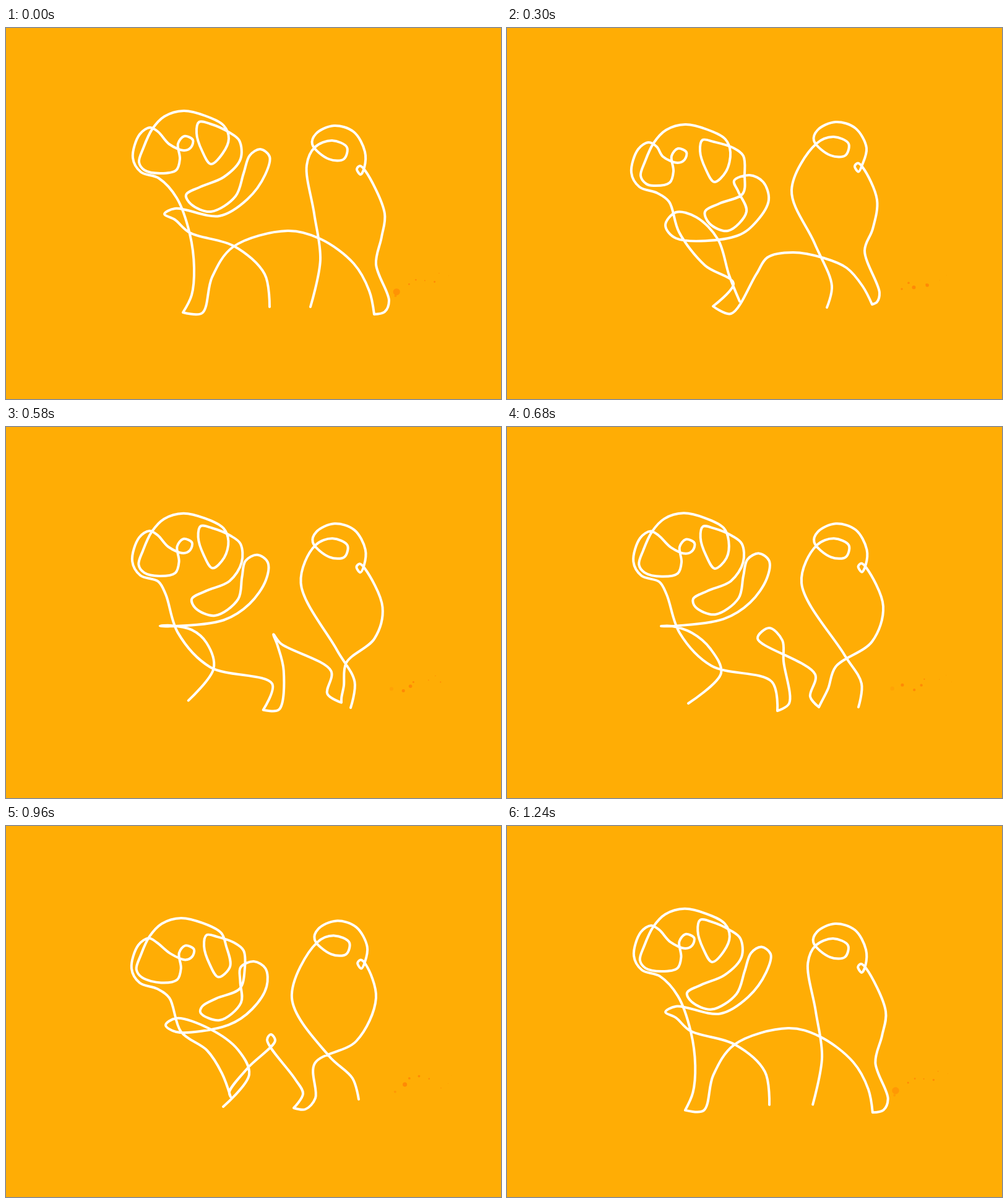
An HTML page with a canvas for the animation above (1.26 s loop, 800 px wide and 600 px high).

```html
<!DOCTYPE html>
<html lang="en">
<head>
<meta charset="utf-8">
<title>Walking line dog</title>
<style>
  html, body { margin: 0; width: 100%; height: 100%; overflow: hidden; background: #ffad05; }
  canvas { display: block; }
</style>
</head>
<body>
<canvas width="800" height="600"></canvas>
<script>
const LOOP = 1260;
const TIMES = [0, 180, 300, 480, 680, 960];

const numbers = text => text.trim().split(/[\s,]+/).map(Number);
const keys = text => text.trim().split('\n').map(numbers);
const pairs = flat => Array.from({ length: flat.length / 2 }, (_, i) => flat.slice(2 * i, 2 * i + 2));
const shape = text => pairs(numbers(text));

// Head motion at each key time: nod, flap of the bib, turn
const HEAD = keys(`
  0 0 0
  .53 .53 0
  1 1 0
  .39 .42 0
  .28 .2 .4
  .77 .55 1`);

// Tip of the collar and how far its loop opens
const COLLAR = keys(`
  256 301 18
  256 314 -10
  256 319 -42
  250 321 -9
  249 322 0
  258 322 -22`);

// Legs and belly: a few joints per key time
const FAR_FORELEG = keys(`
  426,451 418,398 369,353 297,331
  421,455 427,413 397,357 330,325
  376,442 359,400 341,342 306,306
  310,439 333,385 325,340 304,321
  293,447 346,398 329,359 299,333
  351,454 393,402 375,362 329,328`);
const NEAR_FORELEG = keys(`
  276,275 297,333 304,388 300,432 286,460
  266,275 289,338 312,386 317,425 293,453
  262,281 278,330 320,384 366,413 333,450
  259,272 277,332 328,388 419,417 383,454
  258,271 279,333 330,386 428,412 437,459
  264,278 283,333 325,363 349,400 363,438`);
const BELLY = keys(`
  317,461 333,403 367,354 455,328 508,341 562,381 587,425 595,463
  323,459 357,396 395,357 455,349 516,358 552,384 579,415 592,454
  362,462 403,398 421,371 462,363 512,372 549,388 575,418 590,447
  413,465 441,408 431,363 443,348 486,360 549,390 550,426 577,440
  456,447 447,379 445,345 424,325 405,342 498,400 490,436 504,453
  361,430 391,391 435,347 428,337 422,346 467,409 480,433 465,456`);
const NEAR_HINDLEG = keys(`
  612,459 619,441 598,382 607,338 612,300
  603,451 609,435 587,369 598,328 603,288
  598,443 602,428 578,360 591,325 598,278
  576,433 574,418 567,373 598,336 607,290
  508,445 519,423 531,388 590,347 608,290
  484,458 500,440 499,384 566,348 598,278`);
const FAR_HINDLEG = keys(`
  486,222 498,300 508,375 492,451
  468,262 495,346 517,410 498,455
  460,262 497,348 525,417 517,452
  474,255 520,353 550,410 543,454
  476,252 545,368 573,415 568,453
  462,278 522,372 560,408 570,442`);

// The rest is drawn once and only shifts with the head motion.
const BIB_UP = shape('345,304 390,277 419,237 426,208 411,196 394,206 384,235 371,272 331,297 299,285');
const BIB_DOWN = shape('372,336 404,312 423,278 414,249 392,238 367,247 374,265 387,297 357,328 327,316');
const CHEEK = shape('291,270 314,257 352,241');
const NAPE = shape('379,212 377,182 361,169');
const EAR = shape('330,155 312,152 308,170 317,199 331,220 350,203');
const SKULL = shape('360,179 352,158 322,142 287,134 256,143 236,164 222,194 215,217 224,230');
const NOSE = shape('249,235 275,230 281,212 278,187 288,175 302,181 299,193 288,198 264,188');
const FACE = shape('246,168 233,161 216,172 205,210 218,233 247,243');
const RUMP = shape('580,230 572,223 567,228 573,237 579,226');
const TAIL = shape('580,200 562,168 530,158 501,171 495,188 522,212 546,212 551,193 527,182 499,193');

const ctx = document.querySelector('canvas').getContext('2d');
const mix = (a, b, w) => a + (b - a) * w;
const wrap = i => (i + TIMES.length) % TIMES.length;
const span = i => (TIMES[i + 1] ?? LOOP) - TIMES[i];

// Periodic cubic through rows of values with uneven key times
function at(rows, t) {
  const i = TIMES.findLastIndex(time => time <= t);
  const [h0, h1, h2] = [wrap(i - 1), i, wrap(i + 1)].map(span);
  const [a, b, c, d] = [-1, 0, 1, 2].map(k => rows[wrap(i + k)]);
  const u = (t - TIMES[i]) / h1, v = 1 - u;
  return b.map((from, k) => {
    const to = c[k], slope = (to - from) / h1;
    const m0 = (h1 * (from - a[k]) / h0 + h0 * slope) / (h0 + h1);
    const m1 = (h2 * slope + h1 * (d[k] - to) / h2) / (h1 + h2);
    return v * v * (1 + 2 * u) * from + u * u * (1 + 2 * v) * to
      + h1 * u * v * (v * m0 - u * m1);
  });
}

// Three smooth runs that meet in a corner at each near paw
function dogRuns(t) {
  const [nod, flap, turn] = at(HEAD, t);
  const [x, y, open] = at(COLLAR, t);
  const joints = rows => pairs(at(rows, t));
  const shift = (points, [nx, ny], [tx, ty], weight = nod) =>
    points.map(([px, py]) => [px + nx * weight + tx * turn, py + ny * weight + ty * turn]);

  const front = [
    ...joints(FAR_FORELEG),
    [x + 17, y + open / 2], [x, y], [x + 17, y - open / 2],
    ...BIB_UP.map((p, i) => p.map((value, k) => mix(value, BIB_DOWN[i][k], flap))),
    ...shift(CHEEK, [29, 27], [10, 7], flap),
    ...shift(NAPE, [5, 25], [3, 0]),
    ...shift(EAR, [4, 29], [9, 2]),
    ...shift(SKULL, [1, 22], [-5, -2]),
    ...shift(NOSE, [-12, 20], [11, 3]),
    ...shift(FACE, [-4, 24], [1, 2]),
    ...joints(NEAR_FORELEG)
  ];
  const belly = [front.at(-1), ...joints(BELLY)];
  const hind = [
    belly.at(-1),
    ...joints(NEAR_HINDLEG),
    ...shift(RUMP, [-5, -4.5], [5, -3]),
    ...shift(TAIL, [1, -6], [3, 0]),
    ...joints(FAR_HINDLEG)
  ];
  return [front, belly, hind];
}

// Bezier handle at b towards c for a centripetal Catmull-Rom curve
function handle(a, b, c) {
  const d = Math.sqrt(Math.hypot(b[0] - a[0], b[1] - a[1]));
  const e = Math.sqrt(Math.hypot(c[0] - b[0], c[1] - b[1]));
  if (d < 0.1 || e < 0.1) return b;
  return b.map((p, k) =>
    (d * d * c[k] - e * e * a[k] + (2 * d * d + 3 * d * e + e * e) * p) / (3 * d * (d + e)));
}

function traceCurve(p) {
  for (let i = 0; i < p.length - 1; i++) {
    const a = p[i], b = p[i + 1];
    ctx.bezierCurveTo(...handle(p[i - 1] ?? a, a, b), ...handle(p[i + 2] ?? b, b, a), ...b);
  }
}

function drawDog(t) {
  const runs = dogRuns(t);
  ctx.strokeStyle = '#fff';
  ctx.lineWidth = 4;
  ctx.lineCap = ctx.lineJoin = 'round';
  ctx.beginPath();
  ctx.moveTo(...runs[0][0]);
  runs.forEach(traceCurve);
  ctx.stroke();
}

const DUST_COUNT = 15;
const DUST_LIFE = 680;
const random = seed => {
  const v = Math.sin(seed * 12.9898) * 43758.5453;
  return v - Math.floor(v);
};

// Dust leaves the hind paws, drifts right, rises and shrinks away.
function drawDust(t) {
  ctx.fillStyle = '#ff8606';
  for (let i = 0; i < DUST_COUNT; i++) {
    const age = (t + LOOP * (i + random(i + 1)) / DUST_COUNT) % LOOP;
    if (age >= DUST_LIFE) continue;
    const left = 1 - age / DUST_LIFE;
    const y = mix(mix(396, 424, random(i + 21)), mix(424, 444, random(i + 41)), left ** 3);
    ctx.globalAlpha = 0.9 * Math.min(1, age / 120);
    ctx.beginPath();
    ctx.arc(617 + 0.16 * age, y, mix(2, 8, random(i + 61) ** 1.5) * left, 0, 2 * Math.PI);
    ctx.fill();
  }
  ctx.globalAlpha = 1;
}

function draw(now) {
  const t = now % LOOP;
  ctx.fillStyle = '#ffad05';
  ctx.fillRect(0, 0, 800, 600);
  drawDust(t);
  drawDog(t);
}

let start;
function tick(now) {
  start ??= now;
  draw(now - start);
  requestAnimationFrame(tick);
}
draw(0);
requestAnimationFrame(tick);
</script>
</body>
</html>
```
